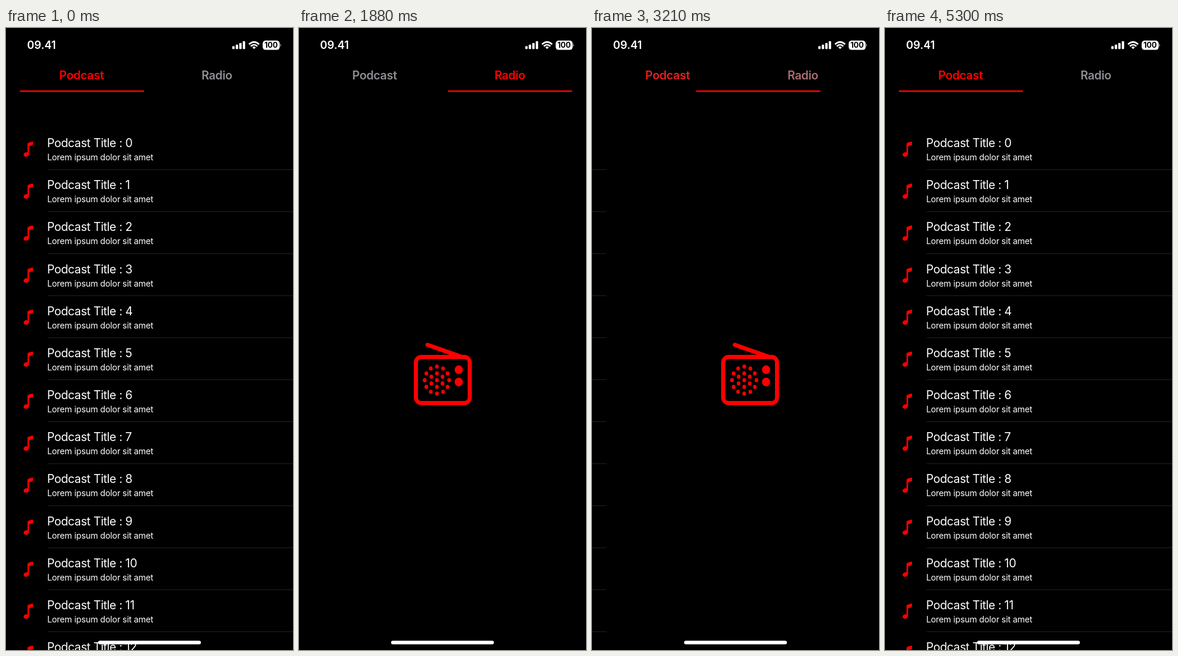
An HTML page that plays this animation: 480x1039 px, repeating every 5390 ms.

```html
<!DOCTYPE html>
<html lang="en">
<head>
<meta charset="utf-8">
<title>Podcast and radio tabs</title>
<style>
  html, body { margin: 0; width: 100%; height: 100%; overflow: hidden; background: #000; }
  svg { display: block; width: 100%; height: 100%; fill: #fff; font-family: Inter, "Liberation Sans", sans-serif; }
  .title { font-size: 19.6px; letter-spacing: -.41px; }
  .sub { font-size: 14.2px; letter-spacing: -.18px; }
  .tab { font-size: 19.5px; font-weight: 600; letter-spacing: -.3px; }
</style>
</head>
<body>
<svg viewBox="0 0 480 1039">
  <defs>
    <g id="note" fill="#f00">
      <path d="M36 193.6Q36.1 192 37.8 191.5L43.8 189.7Q45.2 189.4 45.2 190.6V194.4Q45.2 195.6 44 195.9L38.5 197.6V210H36Z"/>
      <ellipse cx="33.9" cy="211.2" rx="4.6" ry="3.7" transform="rotate(-18 33.9 211.2)"/>
    </g>
  </defs>

  <g id="pages">
    <g id="list"></g>
    <g id="radio" fill="#f00">
      <path d="M215 529.3L271 549" stroke="#f00" stroke-width="7" stroke-linecap="round"/>
      <rect x="195.5" y="549.5" width="90" height="77" rx="9" fill="none" stroke="#f00" stroke-width="6.8"/>
      <ellipse cx="267.2" cy="570.8" rx="6.8" ry="7.3"/>
      <ellipse cx="267.2" cy="591.4" rx="6.8" ry="7.3"/>
    </g>
  </g>

  <text class="tab" id="podcastTab" x="89" y="86">Podcast</text>
  <text class="tab" id="radioTab" x="326.9" y="86">Radio</text>
  <rect id="underline" x="23" y="104.2" width="208" height="2.5" rx="1" fill="#f00"/>

  <text x="35.3" y="35.2" font-size="18.2" font-weight="600">09.41</text>
  <g id="signal"></g>
  <g fill="none" stroke="#fff" stroke-width="2.6">
    <path d="M406.4 27.3Q414.9 19.4 423.4 27.3M409.4 30.5Q414.9 25.5 420.4 30.5"/>
    <path d="M412 32.2Q414.9 29.6 417.8 32.2L414.9 35.2Z" fill="#fff" stroke="none"/>
  </g>
  <rect x="429.3" y="21" width="28.4" height="15.6" rx="5"/>
  <path d="M458.7 26.3Q460.6 28.8 458.7 31.3Z"/>
  <text x="443.4" y="33.4" font-size="12.6" font-weight="700" text-anchor="middle" fill="#000">100</text>
  <rect x="154" y="1023.6" width="172" height="5.9" rx="2.95"/>
</svg>
<script>
const $ = id => document.getElementById(id);
const LOOP = 5390, STEP = 10, PAGE = 480, ROW = 70.17, TAB_STEP = 226;
const RED = [255, 0, 0], GRAY = [142, 142, 147];

// Each page change: start of the swipe, start of the tab bar's reaction (ms)
const SWIPES = [[1030, 1067], [1945, 1983], [2966, 2995], [3758, 3798]];

let rows = '';
for (let i = 0; i < 13; i++) {
  rows += `<g transform="translate(0 ${i * ROW})"><use href="#note"/>
    <text class="title" x="68.7" y="199">Podcast Title : ${i}</text>
    <text class="sub" x="68.9" y="221">Lorem ipsum dolor sit amet</text>
    <rect x="69.5" y="236.1" width="410.5" height="1" fill="#242424"/></g>`;
}
$('list').innerHTML = rows;

$('signal').innerHTML = [5, 7.5, 10.3, 13.2].map((h, i) =>
  `<rect x="${378.4 + i * 5.85}" y="${35.2 - h}" width="4" height="${h}" rx="1.2"/>`).join('');

// Speaker grille: concentric rings of dots
let dots = '';
for (const [count, rx, ry] of [[1, 0, 0], [6, 10.8, 11.3], [12, 20.5, 22.6]]) {
  for (let i = 0; i < count; i++) {
    const a = Math.PI * (2 * i / count + .5);
    dots += `<ellipse cx="${230.7 + rx * Math.cos(a)}" cy="${588.2 + ry * Math.sin(a)}" rx="3.1" ry="3.5"/>`;
  }
}
$('radio').innerHTML += dots;

const clamp = x => Math.min(1, Math.max(0, x));
const easeOut = x => 1 - (1 - x) ** 2.23;
const easeInOut = x => x * x * (3 - 2 * x);
const quadInOut = x => x < .5 ? 2 * x * x : 1 - 2 * (1 - x) ** 2;
const mix = (a, b, p) => `rgb(${a.map((v, i) => Math.round(v + (b[i] - v) * p))})`;

// 0 = podcast, 1 = radio; alternate swipes go forward and back
const progress = (t, column, duration, ease) => SWIPES.reduce((sum, swipe, i) =>
  sum + (i % 2 ? -1 : 1) * ease(clamp((t - swipe[column]) / duration)), 0);

function draw(t) {
  const page = progress(t, 0, 330, easeOut) * PAGE;
  const tab = progress(t, 1, 350, easeInOut) * TAB_STEP;
  const tint = progress(t, 1, 640, quadInOut);
  $('pages').setAttribute('transform', `translate(${-page} 0)`);
  $('underline').setAttribute('transform', `translate(${tab} 0)`);
  $('podcastTab').setAttribute('fill', mix(RED, GRAY, tint));
  $('radioTab').setAttribute('fill', mix(GRAY, RED, tint));
}

$('radio').setAttribute('transform', `translate(${PAGE} 0)`);
const start = performance.now();
function tick() {
  const t = (performance.now() - start) % LOOP;
  draw(Math.floor(t / STEP) * STEP);
  requestAnimationFrame(tick);
}
tick();
</script>
</body>
</html>
```
